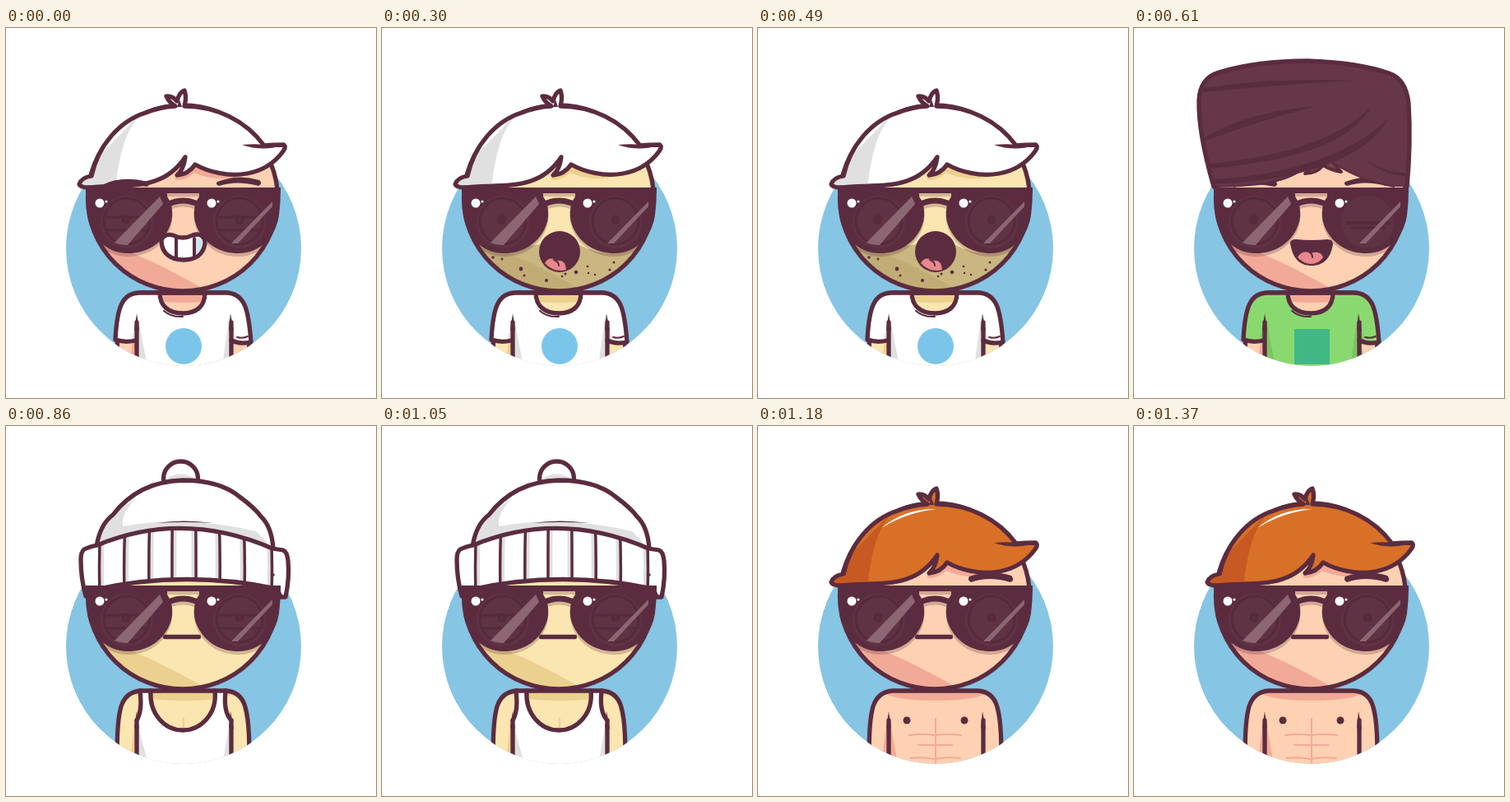
An HTML page for the animation above (1.49 s loop, 450 by 450 pixels).

```html
<!DOCTYPE html>
<html lang="en">
<head>
<meta charset="utf-8">
<title>Changing looks</title>
<style>
html, body { margin: 0; width: 100%; height: 100%; overflow: hidden; background: #fff; }
svg { display: block; width: 100vw; height: 100vh; }
.ink { fill: none; stroke: #5b2c3f; stroke-width: 5.3; stroke-linecap: round; stroke-linejoin: round; }
.thin { stroke-width: 2; }
.dark { fill: #5b2c3f; }
.skin { fill: var(--skin); }
.shade { fill: var(--shade); }
.hair { fill: var(--hair); }
.hairShade { fill: var(--hairShade); }
.shirt { fill: var(--shirt); }
.fold { fill: var(--fold); }
</style>
</head>
<body>
<svg viewBox="0 0 450 450">
  <defs>
    <clipPath id="bust"><circle cx="216" cy="268" r="143"/></clipPath>
    <clipPath id="face"><ellipse cx="215" cy="207" rx="115.5" ry="113"/></clipPath>
    <path id="torso" d="M136 425C134 380 136 355 140 341Q146 323 164 322H267Q286 323 291 342C296 360 296 382 296 425Z"/>
    <path id="lens" d="M97 194H196V205C204 216 204 232 198 244C188 264 170 274 148 274C122 274 103 254 99 228Q97 212 97 194Z"/>
    <g id="glasses">
      <path class="dark" d="M97 194H334V201H97Z"/>
      <path class="ink" d="M198 214Q215 206 233 214" style="stroke-width:7"/>
      <use href="#lens" class="dark"/>
      <use href="#lens" class="dark" transform="translate(431 0) scale(-1 1)"/>
    </g>
    <path id="hairShape" d="M89 190C91 184 97 181 104 180C112 143 138 113 170 103Q187 96 206 95C201 92 197 88 195 83Q202 82 208 89C209 83 213 77 217 76Q220 84 217 95C255 95 291 112 314 143Q325 142 338 142Q341 145 337 150C326 165 310 174 293 177C270 181 246 175 230 166Q222 178 208 179C215 173 217 166 218 157C208 172 196 181 181 186C158 194 128 191 100 194Q91 194 89 190Z"/>
    <clipPath id="hairClip"><use href="#hairShape"/></clipPath>
    <path id="turbanShape" d="M97 193C86 155 78 120 79 88Q80 61 103 54Q150 40 211 40Q272 42 310 55Q331 62 334 92Q337 140 332 193H316Q266 183 236 159Q222 159 213 165C193 186 157 193 97 193Z"/>
    <path id="domeShape" d="M110 147Q114 120 130 108C150 82 178 67 215 66C250 66 272 76 284 86Q303 100 310 110Q323 122 325 149"/>
    <path id="bandShape" d="M95 150Q101 147 111 145Q215 102 324 149L337 151Q342 153 343 164Q345 185 340 208H334L330 198Q215 174 103 200L97 207Q91 185 91 163Q91 153 95 150Z"/>
    <clipPath id="band"><use href="#bandShape"/></clipPath>
  </defs>

  <circle cx="216" cy="268" r="143" fill="#86c5e4"/>

  <g clip-path="url(#bust)">
    <use href="#torso" class="skin"/>
    <path class="shade" d="M150 322H283Q270 334 216 334T150 322ZM158 350L150 412H164Z"/>
    <g data-part="bare">
      <path fill="none" stroke="#f2aa98" stroke-width="2" stroke-linecap="round" d="M216 356V412M184 376Q200 374 214 376Q232 374 247 376M195 388H236M186 404Q200 402 214 405Q230 402 246 404"/>
      <circle class="dark" cx="181" cy="358" r="4.5"/>
      <circle class="dark" cx="251" cy="358" r="4.5"/>
      <path class="shade" d="M159 350L170 412H158Z"/>
    </g>
    <g data-part="tank">
      <path fill="#fff" d="M163 322H176C174 349 192 370 215 370S257 349 254 322H267C265 340 267 351 274 358V412H159V358Q166 346 163 322Z"/>
      <path fill="#e0e0e0" d="M160 362L173 412H159ZM273 356L263 412H274Z"/>
      <path class="ink" d="M176 322C174 349 192 370 215 370S257 349 254 322M163 322Q166 346 159 358M267 322C265 340 267 351 274 358"/>
      <path d="M216 355V367" stroke="#ebd08f" stroke-width="2"/>
    </g>
    <use href="#torso" class="ink"/>
    <g data-part="tee">
      <path class="shirt" d="M133 379C135 340 141 322 163 322H187C187 339 199 347 215 347S242 339 242 322H268C291 323 295 343 298 382Q285 385 274 380V412H159V380Q144 383 133 379Z"/>
      <path class="fold" d="M160 349L172 412H158ZM272 347L263 412H280ZM158 351L153 380H158ZM274 356L281 383H274Z"/>
      <path class="ink" d="M133 379C135 340 141 322 163 322H268C291 323 295 343 298 382Q285 385 274 380M133 379Q144 383 158 380M187 322C187 339 199 347 215 347S242 339 242 322"/>
      <path class="ink thin" d="M192 344Q201 352 215 351M281 376Q288 378 294 375"/>
    </g>
    <path class="ink" d="M159 358V412M274 358V412"/>
    <path class="dark" d="M159 347L162 368H156ZM273 347L277 368H271Z"/>
    <circle data-part="roundBadge" cx="216" cy="387" r="22" fill="#7cc5ea"/>
    <rect data-part="squareBadge" x="195" y="366" width="43" height="43" fill="#41b883"/>
  </g>

  <g clip-path="url(#face)">
    <rect class="skin" x="90" y="90" width="250" height="235"/>
    <path class="shade" d="M95 240Q118 268 151 273Q190 288 243 319L216 330H90Z"/>
    <g data-part="beard">
      <path fill="#cab680" d="M95 240Q130 274 164 270Q187 263 193 263H238Q267 278 290 272Q325 262 340 220V330H90Z"/>
      <path fill="#bba56e" d="M95 240Q118 268 151 273Q190 288 243 319L216 330H90Z" opacity=".55"/>
      <g class="dark" id="stubble"></g>
    </g>
    <use href="#glasses" y="4" opacity=".25"/>
    <path class="shade" data-part="fringe" d="M206 181Q219 179 230 169Q258 183 286 180Q256 188 229 176Q220 185 206 185Z"/>
  </g>
  <ellipse class="ink" cx="215" cy="207" rx="115.5" ry="113"/>

  <g data-part="hair">
    <use href="#hairShape" class="hair"/>
    <path class="hairShade" clip-path="url(#hairClip)" d="M85 200L104 165L168 100Q147 122 141 150Q135 170 133 200Z"/>
    <path data-part="shine" fill="#fff" d="M150 124Q179 100 217 101Q181 105 150 124Z"/>
    <use href="#hairShape" class="ink"/>
    <path class="dark" d="M287 142Q307 140 324 143L338 142Q313 151 287 142Z"/>
    <path class="dark" d="M202 91L208 96L211 87L214 96H199Z"/>
  </g>

  <path class="dark" data-part="leftBrow" d="M119 190Q141 179 173 187Q176 191 171 193Q145 187 121 194Z"/>
  <path class="dark" data-part="rightBrow" d="M257 187Q282 177 308 185Q313 189 307 192Q281 185 259 192Q254 190 257 187Z"/>
  <path class="dark" data-part="raisedBrow" d="M257 183Q282 174 308 182Q313 187 307 190Q281 182 259 190Q254 187 257 183Z"/>

  <g data-part="turban">
    <path class="ink" style="fill:#754936;stroke-width:4" d="M218 157C217 166 215 173 208 177Q222 177 230 167Q240 173 252 175L236 157Z"/>
    <use href="#turbanShape" fill="#653749"/>
    <path fill="#592c3e" d="M82 74Q160 60 265 64Q190 68 84 78ZM82 135Q140 101 222 95Q150 113 82 139ZM88 166C180 155 240 140 288 97C258 146 180 163 90 171ZM96 184C190 180 270 150 309 110C280 165 190 186 96 190ZM282 160Q305 175 332 177V180Q304 180 282 160Z"/>
    <path class="ink" d="M97 193C86 155 78 120 79 88Q80 61 103 54Q150 40 211 40Q272 42 310 55Q331 62 334 92Q337 140 332 193"/>
    <path class="ink thin" d="M97 193C157 193 193 186 213 165M236 159Q266 183 316 193"/>
  </g>

  <g data-part="beanie">
    <circle cx="212.500" cy="64" r="21" fill="#fff"/>
    <path fill="#e0e0e0" d="M192 66Q212 51 233 66V75H192Z"/>
    <circle class="ink" cx="212.500" cy="64" r="21"/>
    <use href="#domeShape" fill="#fff"/>
    <path fill="#e0e0e0" d="M110 147Q114 120 130 108L158 88Q140 106 142 122Q220 108 304 128L325 149Z"/>
    <use href="#domeShape" class="ink"/>
    <path class="dark" d="M183 118Q216 113 252 118Q216 116 183 118Z"/>
    <use href="#bandShape" fill="#fff"/>
    <g clip-path="url(#band)" id="ribs"></g>
    <path fill="#fbe5b0" d="M143 194Q215 184 292 194Z"/>
    <use href="#bandShape" class="ink"/>
    <circle class="dark" cx="325" cy="181" r="1.800"/>
  </g>

  <use href="#glasses"/>
  <g fill="#68404e" opacity=".35">
    <circle cx="147" cy="236" r="32"/><circle cx="284" cy="236" r="32"/>
  </g>
  <g fill="none" stroke="#552a3b" stroke-width="3">
    <g data-part="leftEye"><circle cx="147" cy="235" r="28"/><circle class="dark" cx="146" cy="233" r="4"/></g>
    <g data-part="rightEye"><circle cx="284" cy="235" r="28"/><circle class="dark" cx="284" cy="233" r="4"/></g>
    <path data-part="lids" d="M121 230H173M121 246H173M258 230H310M258 246H310"/>
    <path data-part="wink" d="M258 237H312M264 243H306" stroke-width="4"/>
  </g>
  <path fill="#8c6673" d="M187 205L191 214L148 264Q139 264 132 261ZM324 211V217L282 262H274Z"/>
  <g fill="#fff">
    <circle cx="114" cy="213" r="5.500"/><circle cx="122" cy="211" r="1.600"/>
    <circle cx="250" cy="213" r="5.500"/><circle cx="258" cy="211" r="1.600"/>
  </g>

  <g data-part="grin">
    <path class="ink" style="fill:#fff" d="M189 260C189 253 196 250 203 252Q215 258 227 252C235 249 242 253 242 262C240 275 231 282 216 282S190 275 189 260Z"/>
    <path fill="#cfe5f0" d="M231 256Q238 254 239 262Q237 272 231 276Z"/>
    <path class="ink" style="stroke-width:4" d="M207 256V279M229 256V278"/>
  </g>
  <g data-part="gasp">
    <circle class="dark" cx="216" cy="272" r="25"/>
    <path fill="#e8888d" d="M198 286Q203 277 213 283Q223 281 224 294Q209 298 198 286Z"/>
    <path class="ink thin" d="M209 282Q215 284 215 289"/>
  </g>
  <g data-part="smile">
    <path class="dark" d="M190 262Q190 257 197 257Q216 259 235 257Q242 257 242 263C239 281 230 289 216 289S193 281 190 262Z"/>
    <path fill="#e8888d" d="M199 279Q205 269 215 274Q227 270 230 279Q224 287 215 287Q205 286 199 279Z"/>
    <path class="ink thin" d="M214 273Q217 275 217 279"/>
  </g>
  <path class="ink" data-part="flat" d="M193.500 256.500H234.500"/>
</svg>
<script>
const pick = id => document.getElementById(id);

pick('stubble').innerHTML = [
  [135, 279, 1.8], [146, 281, 1.4], [169, 293, 2.4], [173, 301, 1.5], [200, 307, 2],
  [219, 302, 1.3], [223, 299, 1.5], [236, 297, 2.3], [250, 290, 1.3], [251, 298, 1.2],
  [259, 300, 1.2], [277, 294, 1.6], [282, 285, 1.5]
].map(([x, y, r]) => `<circle cx="${x}" cy="${y}" r="${r}"/>`).join('');

pick('ribs').innerHTML = [114, 144, 174, 202, 231, 260, 290, 323].map(x => {
  const bend = (x - 216) * 0.015;
  const shift = x < 216 ? 3 : -3;
  const line = `M${x - bend} 115Q${x + bend} 158 ${x} 202`;
  return `<path d="${line}" transform="translate(${shift})" fill="none" stroke="#e0e0e0" stroke-width="5"/>` +
    `<path class="ink" style="stroke-width:3.5" d="${line}"/>`;
}).join('');

const pink = { skin: '#fdd1b2', shade: '#f2aa98' };
const cream = { skin: '#fbe5b0', shade: '#ebd08f' };
const white = { hair: '#fff', hairShade: '#e0e0e0', shirt: '#fff', fold: '#e0e0e0' };
const eyes = 'leftEye rightEye ';

const looks = [
  { until: 300, parts: eyes + 'tee roundBadge hair fringe leftBrow rightBrow lids grin', colors: { ...pink, ...white } },
  { until: 610, parts: eyes + 'tee roundBadge hair fringe beard gasp', colors: { ...cream, ...white } },
  { until: 860, parts: 'leftEye wink tee squareBadge turban leftBrow rightBrow smile', colors: { ...pink, shirt: '#8ad970', fold: '#7bc562' } },
  { until: 1180, parts: eyes + 'lids tank beanie flat', colors: cream },
  { until: 1490, parts: eyes + 'bare hair fringe shine raisedBrow flat', colors: { ...pink, hair: '#d97027', hairShade: '#c65a22' } }
];
const duration = looks[looks.length - 1].until;
const parts = [...document.querySelectorAll('[data-part]')];
let current;

function show(look) {
  if (look === current) return;
  current = look;
  const active = new Set(look.parts.split(' '));
  for (const part of parts) part.style.display = active.has(part.dataset.part) ? '' : 'none';
  for (const [name, value] of Object.entries(look.colors)) {
    document.documentElement.style.setProperty('--' + name, value);
  }
}

let start;
function tick(now) {
  start ??= now;
  const time = (now - start) % duration;
  show(looks.find(look => time < look.until));
  requestAnimationFrame(tick);
}
show(looks[0]);
requestAnimationFrame(tick);
</script>
</body>
</html>
```
